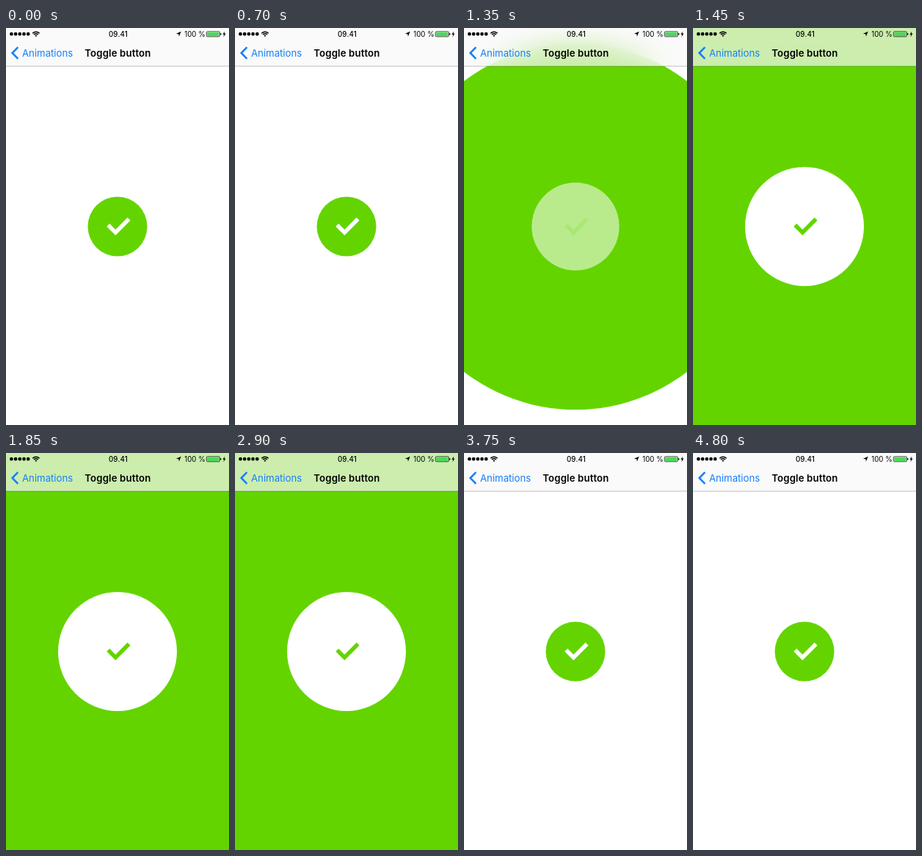
Recreate the animation shown at these times as an HTML page. Size 304 by 540 pixels, loop 4850 ms.

```html
<!DOCTYPE html>
<html lang="en">
<head>
<meta charset="utf-8">
<title>Toggle button</title>
<style>
  html, body { margin: 0; width: 100%; height: 100%; overflow: hidden; background: #fff; }
  svg { position: absolute; left: 0; top: 0; display: block; }
  #bar {
    position: absolute; left: 0; top: 0; width: 304px; height: 52px;
    background: rgba(248, 248, 248, .7);
    backdrop-filter: blur(16px);
  }
  text { font-family: Inter, Roboto, sans-serif; }
  .status { font-size: 9.7px; }
  .nav { font-size: 13.2px; }
  .title { font-weight: 600; letter-spacing: .15px; }
</style>
</head>
<body>
<svg width="304" height="540">
  <circle id="fill" cx="152" cy="270" fill="#64d400"/>
  <circle id="disc" cx="152" cy="270" fill="#fff"/>
  <path id="check" d="M139.2 268 149.3 278.1 167.6 259.7" fill="none" stroke-width="5.5"/>
</svg>
<div id="bar">
  <svg width="304" height="53">
    <path d="M0 52h304" stroke="#000" stroke-width="2" opacity=".12"/>
    <path d="M7.4 8.2h23" stroke="#000" stroke-width="4.7" stroke-linecap="round" stroke-dasharray="0 5.7"/>
    <g fill="none" stroke="#000" stroke-width="1.4">
      <path d="M36.2 7.2a6.6 6.6 0 0 1 9.4 0M37.9 9a4.2 4.2 0 0 1 6 0"/>
      <path d="M40.9 11.9 39.4 10.3a2.1 2.1 0 0 1 3 0z" fill="#000" stroke="none"/>
    </g>
    <text class="status" x="153" y="11.8" text-anchor="middle" font-weight="500" letter-spacing=".2">09.41</text>
    <path d="M238.7 4.8 235.9 11.6 235.3 8.3 231.9 7.7z"/>
    <text class="status" x="243.3" y="11.8">100 %</text>
    <rect x="273.3" y="4.8" width="18.2" height="7" rx="1.4" fill="none" stroke="#000" stroke-width=".7"/>
    <rect x="274.2" y="5.7" width="16.4" height="5.2" rx=".7" fill="#4cd95a"/>
    <path d="M292.2 7a1.3 1.3 0 0 1 0 2.6z"/>
    <path d="M298.3 4.5 295.4 8.7H297.2L296.4 12.2 299.6 7.6H297.6z"/>
    <path d="M16.3 26.2 8.6 34 16.3 41.8" fill="none" stroke="#167efb" stroke-width="2.5"/>
    <text class="nav" x="22" y="39" fill="#167efb">Animations</text>
    <text class="nav title" x="107.3" y="39">Toggle button</text>
  </svg>
</div>
<script>
  const LOOP = 4850, DURATION = 200, TURN_ON = 1241, TURN_OFF = 3367.6;
  const fill = document.getElementById('fill');
  const disc = document.getElementById('disc');
  const check = document.getElementById('check');

  const clamp = x => Math.max(0, Math.min(1, x));
  const mix = (a, b, k) => a + (b - a) * k;

  // cubic-bezier(0, 0, .58, 1)
  function easeOut(x) {
    let lo = 0, hi = 1;
    for (let i = 0; i < 24; i++) {
      const s = (lo + hi) / 2;
      if (1.74 * s * s - .74 * s ** 3 < x) lo = s; else hi = s;
    }
    return 3 * lo * lo - 2 * lo ** 3;
  }

  function draw(t) {
    const closing = t >= TURN_OFF;
    const x = clamp((t - (closing ? TURN_OFF : TURN_ON)) / DURATION);
    const eased = x === 1 ? 1 : easeOut(x);
    const size = closing ? 1 - eased : eased;
    const fade = closing ? 1 - x : x;
    fill.setAttribute('r', mix(40.5, 324, size));
    disc.setAttribute('r', 81 * size);
    disc.setAttribute('opacity', fade);
    check.setAttribute('stroke',
      `rgb(${mix(255, 100, fade)},${mix(255, 212, fade)},${mix(255, 0, fade)})`);
  }

  const start = performance.now();
  function tick(now) {
    draw(Math.max(0, now - start) % LOOP);
    requestAnimationFrame(tick);
  }
  draw(0);
  requestAnimationFrame(tick);
</script>
</body>
</html>
```
